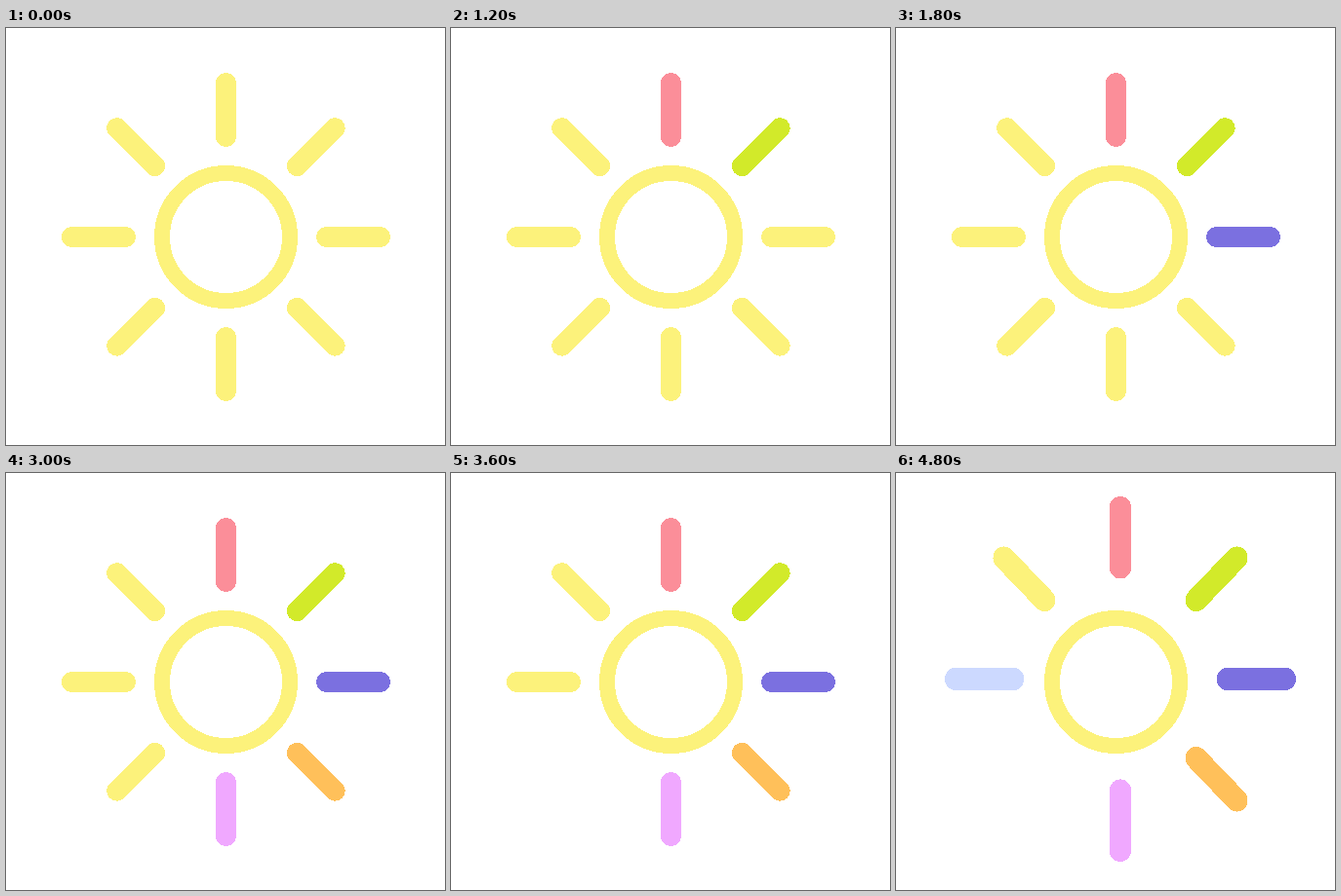
Write an HTML page that moves like this. It is 450 px wide and 428 px high and loops after 5.4 s.

```html
<!DOCTYPE html>
<html lang="en">
<head>
<meta charset="utf-8">
<title>Sun</title>
<style>
  html, body { margin: 0; width: 100%; height: 100%; overflow: hidden; background: #fff; }
  svg { display: block; width: 450px; height: 428px; shape-rendering: crispEdges; }
  circle { fill: none; stroke: #fcf27b; stroke-width: 16; }
  line { stroke-width: 21; stroke-linecap: round; }
</style>
</head>
<body>
<svg viewBox="0 0 450 428">
  <circle cx="225.5" cy="214.5" r="65.5"/>
  <g id="rays"></g>
</svg>
<script>
  const STEP = 600;
  const LOOP = 5400;
  const YELLOW = '#fcf27b';
  // Clockwise from the top; the white ray vanishes and the last one stays yellow.
  const COLORS = ['#fb8e99', '#d2ea2a', '#7b70e0', '#ffc05a', '#f0a8ff', '#ffffff', '#ccd9ff', YELLOW];
  const RESTING = 'translate(225.5 214.5)';
  const STRETCHED = 'translate(230 211.5) scale(1.068 1.113)';

  const group = document.getElementById('rays');
  const rays = COLORS.map((_, i) => {
    const ray = document.createElementNS(group.namespaceURI, 'line');
    ray.setAttribute('y1', -103);
    ray.setAttribute('y2', -158);
    ray.setAttribute('transform', `rotate(${i * 45})`);
    return group.appendChild(ray);
  });

  function draw(time) {
    const step = Math.floor((time % LOOP) / STEP);
    rays.forEach((ray, i) => ray.setAttribute('stroke', i < step ? COLORS[i] : YELLOW));
    group.setAttribute('transform', step === 8 ? STRETCHED : RESTING);
  }

  const start = performance.now();
  function tick() {
    draw(performance.now() - start);
    requestAnimationFrame(tick);
  }
  tick();
</script>
</body>
</html>
```
